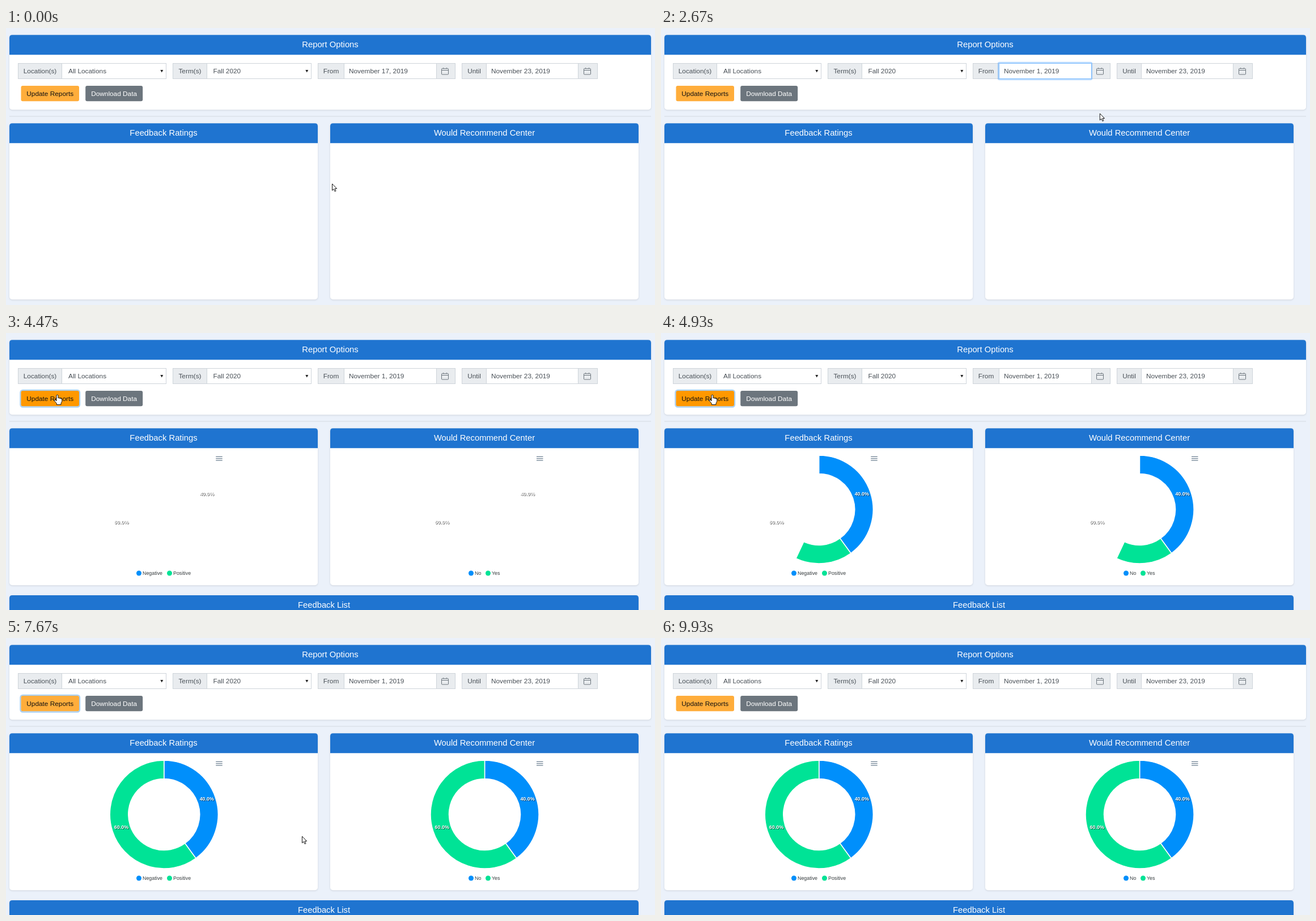
Animation of 1145 by 489 pixels, one loop 9.99 s. Source, as an HTML page:

```html
<!DOCTYPE html>
<html lang="en">
<head>
<meta charset="utf-8">
<title>Report Options</title>
<style>
html, body { margin: 0; width: 100%; height: 100%; overflow: hidden; background: #ebf1fa; }
svg { display: block; width: 100%; height: 100%; font: 11.84px "Liberation Sans", Arial, sans-serif; }
.card { filter: drop-shadow(0 1.5px 1.5px rgba(0, 0, 0, .12)); }
.title { font-size: 14.8px; fill: #fff; }
.mid { text-anchor: middle; }
.field { fill: #495057; }
.percent { font-size: 8.9px; font-weight: bold; fill: #fff; filter: drop-shadow(1px 1px .7px rgba(0, 0, 0, .6)); }
.legend { font-size: 8.9px; fill: #373d3f; }
.tip { font-size: 10.4px; fill: #fff; }
.line { fill: none; stroke: #6c757d; }
</style>
</head>
<body>
<svg id="stage" viewBox="0 0 1145 489"></svg>
<script>
const LOOP = 9990;
const BLUE = '#008ffb', GREEN = '#00e396', BLUE_LIT = '#26a0fc', GREEN_LIT = '#26e8a6';
const OUTER = 95.5, INNER = 63, CENTER_Y = 311.5, SPLIT = 144;

// Pointer stops: time, x, y
const STOPS = [
  [0, 575.5, 275], [70, 575.5, 275], [330, 344, 142], [530, 344, 142],
  [1270, 785, 79], [1470, 785, 79], [2400, 775, 165], [2530, 775, 165],
  [2670, 775, 151], [3470, 142, 116], [3720, 90.5, 109], [5900, 90.5, 109],
  [6400, 379, 253], [6870, 354, 300], [7070, 354, 300], [7670, 522, 350],
  [8000, 783, 366], [8070, 783, 366], [8200, 783, 290], [8800, 783, 290],
  [9400, 12, 458]
];
const CALENDAR = { from: 1480, to: 2530 };
const CLICK = 3800, LOADED = 4440, GROW = 4475, GROW_TIME = 800;

const charts = [
  { x: 278.75, names: ['Negative', 'Positive'], dots: [234.5, 288.5], counts: [2, 3] },
  { x: 844.5, names: ['No', 'Yes'], dots: [820.5, 850.5], counts: [2, 3] }
];

const rect = (x, y, w, h, fill, more = '') =>
  `<rect x="${x}" y="${y}" width="${w}" height="${h}" fill="${fill}" ${more}/>`;
const text = (x, y, value, cls, more = '') =>
  `<text x="${x}" y="${y}" class="${cls}" ${more}>${value}</text>`;

function card(x, y, w, h, title) {
  return `<g class="card">${rect(x, y, w, h, '#fff', 'rx="5"')}</g>
    <path d="M${x} ${y + 35}v-30q0-5 5-5h${w - 10}q5 0 5 5v30z" fill="#1f74d0"/>` +
    text(x + w / 2, y + 21.7, title, 'title mid');
}

// Input group: label box, value box and an optional calendar button
function group(x, split, end, right, label, value, pad, id = '') {
  const box = (a, b, fill) => rect(a + .5, 62.5, b - a, 27, fill, 'stroke="#ced4da"');
  const icon = right > end
    ? box(end, right, '#e9ecef') + `<path class="line" d="M${right - 22.5} 71.5h10q1 0 1 1v8.500q0 1-1 1h-10q-1 0-1-1v-8.500q0-1 1-1zM${right - 23.5} 74.500h12M${right - 20.500} 70v2M${right - 14.500} 70v2"/>`
    : `<path d="M${end - 9.7} 74h5l-2.500 4.500z" fill="#222"/>`;
  return rect(x, 62, right - x + 1, 28.5, '#fff', 'rx="3"') + box(x, split, '#e9ecef') +
    box(split, end, '#fff') + icon +
    text((x + split) / 2 + .5, 80, label, 'field mid') +
    text(split + pad, 80, value, 'field', id);
}

function calendar() {
  const x = 595.5, y = 91.5, cw = 228 / 7, ch = 31;
  let out = rect(x, y, 228, 217, '#fff', 'stroke="#c9cdd1" rx="3"') +
    text(x + 114, y + 20, 'November 2019', 'field mid') +
    text(x + cw / 2, y + 20, '‹', 'field mid') + text(x + 6.5 * cw, y + 20, '›', 'field mid');
  [...'SMTWTFS'].forEach((d, i) => out += text(x + (i + .5) * cw, y + ch + 20, d, 'field mid', 'font-weight="bold"'));
  for (let day = 1; day <= 30; day++) {
    const n = day + 4, cx = x + n % 7 * cw, cy = y + (2 + Math.floor(n / 7)) * ch;
    const picked = day === 17;
    if (picked) out += rect(cx, cy, cw, ch, '#007bff', 'rx="3"');
    if (day === 1) out += rect(cx, cy, cw, ch, '#e9ecef', 'rx="3" id="firstDay"');
    out += text(cx + cw / 2, cy + 20, day, 'mid', `fill="${picked ? '#fff' : '#212529'}"`);
  }
  return out;
}

function chart({ x, names, dots }, i) {
  const menu = x + 91.5;
  return [0, 1].map(s => `<path id="slice${i}${s}" stroke="#fff" stroke-width="1.5"/>`).join('') +
    `<path d="M${menu} 218.300h11.500m-11.500 3.300h11.500m-11.500 3.300h11.500" fill="none" stroke="#6e8192" stroke-width="1.300"/>` +
    text(x + 75.5, 286.8, '40.0%', 'percent mid') + text(x - 75.3, 336.5, '60.0%', 'percent mid') +
    names.map((name, s) => `<circle cx="${dots[s]}" cy="424" r="4.5" fill="${s ? GREEN : BLUE}"/>` +
      text(dots[s] + 6.5, 427, name, 'legend')).join('');
}

const stage = document.getElementById('stage');
stage.innerHTML =
  card(6, 12.3, 1132, 132, 'Report Options') +
  group(21, 98, 282, 282, 'Location(s)', 'All Locations', 12) +
  group(294, 354, 538, 538, 'Term(s)', 'Fall 2020', 11.5) +
  group(550, 596, 759, 792, 'From', '', 9, 'id="fromDate"') +
  group(804, 847, 1009, 1043, 'Until', 'November 23, 2019', 9) +
  `<g id="inputRing">${rect(595, 61, 165, 30, 'none', 'stroke="#007bff" stroke-opacity=".27" stroke-width="2.4" rx="2"')}
    ${rect(596.5, 62.5, 163, 27, 'none', 'stroke="#80bdff"')}</g>` +
  rect(25.5, 101, 104.5, 29.5, 'none', 'id="buttonRing" stroke="#a9d0f5" stroke-width="2.4" rx="4"') +
  rect(26.5, 102, 102.5, 27.3, '', 'id="update" rx="3"') + text(77.7, 120, 'Update Reports', 'mid', 'fill="#111"') +
  rect(140.2, 102, 101, 27.3, '', 'id="download" rx="3"') + text(190.6, 120, 'Download Data', 'mid', 'fill="#fff"') +
  rect(6, 155.5, 1132, 1, '#d3d9e1') +
  `<g id="empty">${card(6, 168.3, 544, 311, 'Feedback Ratings')}${card(572, 168.3, 544, 311, 'Would Recommend Center')}</g>
  <g id="filled">${card(6, 168.3, 544, 277, 'Feedback Ratings')}${card(572, 168.3, 544, 277, 'Would Recommend Center')}
    ${card(6, 463, 1110, 60, 'Feedback List')}${charts.map(chart).join('')}</g>
  <g id="calendar">${calendar()}</g>
  <g id="tooltip"><rect id="tipBox" height="26" rx="4"/><text id="tipText" class="tip mid" y="17"/></g>
  <path id="pointer" fill="#fff" stroke="#111" stroke-linejoin="round"/>`;

const $ = id => document.getElementById(id);
const show = (id, on) => $(id).style.display = on ? '' : 'none';
const paint = (id, fill) => $(id).setAttribute('fill', fill);
const clamp = v => Math.max(0, Math.min(1, v));
const fade = (t, start, length = 150) => 1 - (1 - clamp((t - start) / length)) ** 2;

// Smooth curve through the stops, standing still at rests
function pointerAt(t) {
  let i = STOPS.findIndex(s => s[0] > t) - 1;
  if (i < 0) i = STOPS.length - 2;
  const a = STOPS[i], b = STOPS[i + 1], span = b[0] - a[0], u = clamp((t - a[0]) / span);
  const same = (p, q) => p[1] === q[1] && p[2] === q[2];
  const slope = (k, c) => {
    const p = STOPS[k - 1], q = STOPS[k], r = STOPS[k + 1];
    return !p || !r || same(p, q) || same(q, r) ? 0 : (r[c] - p[c]) / (r[0] - p[0]) * span;
  };
  return [1, 2].map(c => {
    const e = u * u * (3 - 2 * u);
    return a[c] + (b[c] - a[c]) * e + slope(i, c) * u * (1 - u) ** 2 - slope(i + 1, c) * u * u * (1 - u);
  });
}

function slicePath(x, from, to) {
  if (to <= from) return '';
  const at = (r, deg) => {
    const a = deg * Math.PI / 180;
    return `${x + r * Math.sin(a)} ${CENTER_Y - r * Math.cos(a)}`;
  };
  const large = +(to - from > 180);
  return `M${at(OUTER, from)}A${OUTER} ${OUTER} 0 ${large} 1 ${at(OUTER, to)}` +
    `L${at(INNER, to)}A${INNER} ${INNER} 0 ${large} 0 ${at(INNER, from)}Z`;
}

function sliceUnder(cx, px, py) {
  const dx = px - cx, dy = py - CENTER_Y, r = Math.hypot(dx, dy);
  if (r < INNER || r > OUTER) return -1;
  const deg = (Math.atan2(dx, -dy) * 180 / Math.PI + 360) % 360;
  return deg < SPLIT ? 0 : 1;
}

const ARROW = 'M0 0V11.8L2.700 9.300L4.600 13.500L6.500 12.700L4.700 8.600H8.200Z';
const HAND = 'M-1.500 1Q0-.8 1.500 1V6Q3 4.800 4 6.400Q5.500 5.500 6.300 7Q8.300 6.500 8.300 8.500V12L6.500 15V17.500H-1V15.500L-5.300 10.500Q-5.500 8.300-3.500 9L-1.500 11Z';

function render(t) {
  const [x, y] = pointerAt(t);
  const over = (l, top, r, b) => x >= l && x <= r && y >= top && y <= b;
  const picking = t >= CALENDAR.from && t < CALENDAR.to;
  const loaded = t >= LOADED;
  const here = t < 9400;
  const onUpdate = here && over(26, 102, 129, 129), onDownload = here && over(140, 102, 241, 129);
  const onDay = picking && over(758, 153, 791, 184);

  $('fromDate').textContent = t < CALENDAR.to ? 'November 17, 2019' : 'November 1, 2019';
  $('inputRing').style.opacity = fade(t, CALENDAR.to) - fade(t, CLICK);
  $('buttonRing').style.opacity = fade(t, CLICK) - fade(t, 9850, 70);
  paint('update', onUpdate ? '#ff9800' : '#ffad3b');
  paint('download', onDownload ? '#5a6268' : '#6c757d');
  show('calendar', picking);
  show('firstDay', onDay);
  show('empty', !loaded);
  show('filled', loaded);

  const sweep = 360 * clamp((t - GROW) / GROW_TIME);
  let tip = null;
  charts.forEach((c, i) => {
    const hit = here && sweep === 360 ? sliceUnder(c.x, x, y) : -1;
    if (hit >= 0) tip = { label: `${c.names[hit]}: ${c.counts[hit]}`, fill: hit ? GREEN : BLUE };
    [0, 1].forEach(s => {
      const id = `slice${i}${s}`;
      $(id).setAttribute('d', slicePath(c.x, s ? SPLIT : 0, Math.min(sweep, s ? 360 : SPLIT)));
      paint(id, s ? (hit === s ? GREEN_LIT : GREEN) : (hit === s ? BLUE_LIT : BLUE));
    });
  });

  show('tooltip', tip);
  if (tip) {
    $('tipText').textContent = tip.label;
    const w = $('tipText').getComputedTextLength() + 24;
    $('tipBox').setAttribute('width', w);
    $('tipBox').setAttribute('x', -w / 2);
    paint('tipBox', tip.fill);
    $('tooltip').setAttribute('transform', `translate(${x} ${y - 40})`);
  }

  const hand = onUpdate || onDownload || onDay || over(759, 62, 792, 90);
  show('pointer', here);
  $('pointer').setAttribute('d', hand ? HAND : ARROW);
  $('pointer').setAttribute('transform', `translate(${x} ${y})`);
}

function tick() {
  render(performance.now() % LOOP);
  requestAnimationFrame(tick);
}
tick();
</script>
</body>
</html>
```
